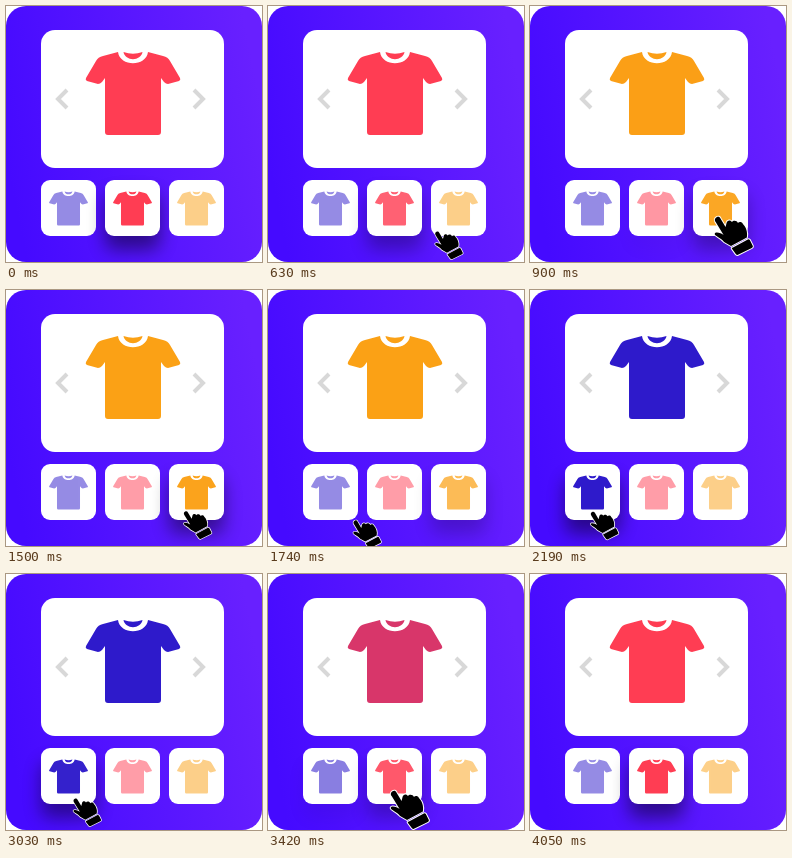
These frames come from a looping animation (256x256 px, 4080 ms). An HTML page:

```html
<!DOCTYPE html>
<html>
<head>
<meta charset="utf-8">
<style>
  html, body { margin: 0; height: 100%; overflow: hidden; background: #fff; }
  svg { display: block; width: 100vw; height: 100vh; }
</style>
</head>
<body>
<svg viewBox="0 0 256 256">
  <defs>
    <linearGradient id="bg" x1="0" y1=".6" x2="1" y2=".4">
      <stop stop-color="#450aff"/>
      <stop offset="1" stop-color="#6820ff"/>
    </linearGradient>
    <filter id="blur" x="-60%" y="-60%" width="220%" height="220%">
      <feGaussianBlur stdDeviation="9"/>
    </filter>
    <g id="shirt">
      <path d="M112 46C114 61 140 61 142 46L157 50Q162 51 164 55L174 72Q175 74 173 75L162 78Q160 78 158 76L155 72V126Q155 129 152 129H102Q99 129 99 126V72L96 76Q94 78 92 78L81 75Q79 74 80 72L90 55Q92 51 97 50Z"/>
      <path d="M117.500 46Q127 49.500 136.500 46C135 55.500 119 55.500 117.500 46Z"/>
    </g>
  </defs>
  <rect width="256" height="256" rx="20" fill="url(#bg)"/>
  <rect x="35" y="24" width="183" height="138" rx="14" fill="#fff"/>
  <path d="M61 84L52 93L61 102M188 84L197 93L188 102" fill="none" stroke="#d8d8d8" stroke-width="4"/>
  <use id="main" href="#shirt"/>
  <g id="thumbs"></g>
  <g id="hand" stroke="#fff" stroke-width="2" stroke-linejoin="round" paint-order="stroke">
    <path d="M-16.500 -18C-19 -16.500 -18.500 -14.500 -17.500 -13L-9.500 0C-12 -2 -18 -4 -18.500 -1C-18.500 1 -12 3 -9 7L-2 11L14 2.500C15 -3 13 -8 10 -11C9 -13.500 6 -13.500 5 -12C4 -15 0 -15 -1 -13C-2.500 -15.500 -6 -15 -6.500 -12L-7.500 -8L-12.500 -16.500C-13.500 -18.500 -15 -19 -16.500 -18Z"/>
    <path d="M-1 14Q-2 13 0 12.500L15 4.500Q16 4 17 5L20 11Q20.500 12 19 13L5 20Q4 20.500 3 19.500Z"/>
  </g>
</svg>
<script>
const LOOP = 4080;
const colors = [[46, 26, 203], [255, 61, 83], [251, 161, 21]];
const spots = [[74, 235], [141, 235], [203, 229]];
const steps = [
  { at: 450, from: 1, to: 2, move: 285, pop: 270 },
  { at: 1470, from: 2, to: 0, move: 335, pop: 420 },
  { at: 3000, from: 0, to: 1, move: 310, pop: 270 }
];
const $ = id => document.getElementById(id);
const ramp = (t, a, b) => Math.min(1, Math.max(0, (t - a) / (b - a)));
const mix = (a, b, p) => a.map((v, i) => v + (b[i] - v) * p);
const rgb = c => `rgb(${c.map(Math.round)})`;

$('thumbs').innerHTML = colors.map((c, i) => {
  const x = 35 + 64 * i;
  return `<rect class="shade" x="${x}" y="188" width="55" height="56" rx="9" filter="url(#blur)"/>
    <rect x="${x}" y="174" width="55" height="56" rx="9" fill="#fff"/>
    <use class="tee" href="#shirt" fill="${rgb(c)}" transform="translate(${x + 27.5} 202.500) scale(.411) translate(-127 -87.500)"/>`;
}).join('');
const shades = document.querySelectorAll('.shade');
const tees = document.querySelectorAll('.tee');

function draw(t) {
  const step = steps.filter(s => t >= s.at).pop() || steps[0];
  const { from, to, move, pop } = step;
  const dt = t - step.at;
  const fadeOut = 1 - ramp(dt, 0, 480);

  $('main').setAttribute('fill', rgb(mix(colors[from], colors[to], ramp(dt, 275, 455))));
  const level = (i, fadeIn) => i === from ? fadeOut : i === to ? fadeIn : 0;
  tees.forEach((el, i) => el.style.opacity = 0.5 + 0.5 * level(i, ramp(dt, 270, 480)));
  shades.forEach((el, i) => el.style.opacity = 0.45 * level(i, ramp(dt, 270, 570)));

  // The hand swings along a shallow arc, then swells for the press.
  const p = ramp(dt, 0, move);
  const [x, y] = mix(spots[from], spots[to], p);
  const dip = 0.135 * Math.abs(spots[to][0] - spots[from][0]) * Math.sin(Math.PI * p);
  const press = Math.sin(Math.PI * ramp(dt, pop, pop + (pop > 300 ? 300 : 330)));
  const size = 0.72 * (1 + 0.38 * press);
  $('hand').setAttribute('transform', `translate(${x} ${y + dip}) scale(${size})`);
  $('hand').style.opacity = ramp(t, 450, 600) * (1 - ramp(t, 3900, 4050));
}

function frame() {
  draw(performance.now() % LOOP);
  requestAnimationFrame(frame);
}
frame();
</script>
</body>
</html>
```
